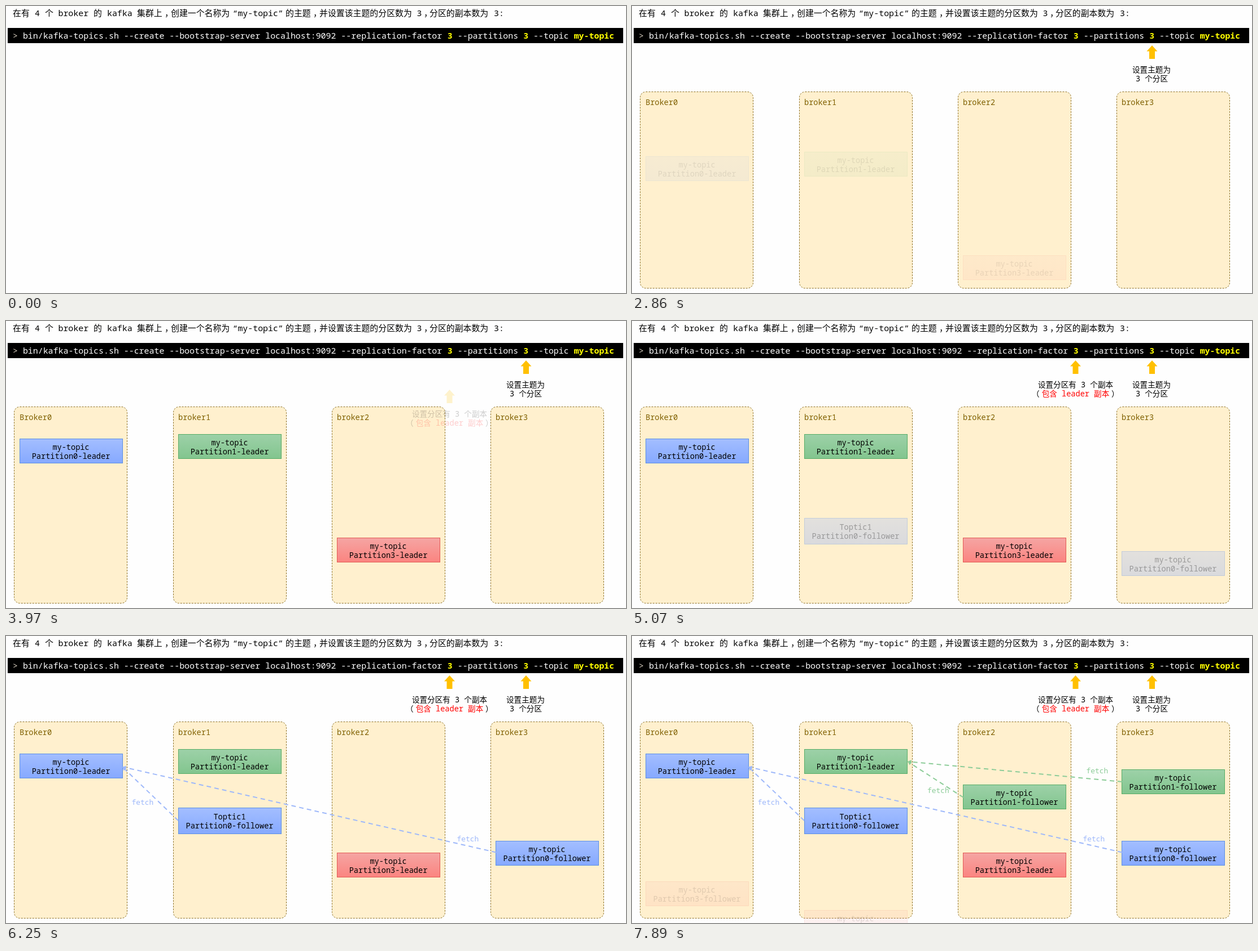
An HTML page with a canvas that plays this animation: 1098 px wide and 510 px high, repeating every 8000 ms.

```html
<!DOCTYPE html>
<html lang="zh-CN">
<head>
<meta charset="utf-8">
<title>Topic partitions and replicas</title>
<style>
html, body { margin: 0; width: 100%; height: 100%; overflow: hidden; background: #fefefe; }
canvas { display: block; }
</style>
</head>
<body>
<canvas id="stage" width="1098" height="510"></canvas>
<script>
const ctx = document.getElementById('stage').getContext('2d');
const LOOP = 8000;
const RISE = 59;
const FAMILY = '"Noto Sans Mono", "Noto Sans CJK SC", "Noto Sans CJK", monospace';
const CELL = 0.6;

// [first change, last change, number of pictures]
const BURSTS = [
  [600, 1160, 8], [1850, 2620, 11], [2700, 3500, 11], [3570, 4360, 11],
  [4430, 5160, 10], [5240, 6030, 11], [6100, 6900, 11], [6970, 7740, 11], [7820, 7890, 2]
];

const COLORS = {
  blue: { top: '#a3beff', bottom: '#86a9ff', edge: '#5b8fe3', rgb: '158,184,250' },
  green: { top: '#9dd1a8', bottom: '#82c58e', edge: '#55ac66', rgb: '140,204,152' },
  red: { top: '#f5a5a3', bottom: '#fb8480', edge: '#e25a55' }
};

const clamp = v => Math.max(0, Math.min(1, v));

// Column edges, snapped so that thin outlines stay crisp.
const column = (first, i) => Math.floor(first + 281.2 * i) + 0.5;
const brokerX = i => column(14.9, i);
const cardX = i => column(24.4, i);

// Steady motion with a short speed-up and slow-down.
function glide(t, up = 0.2, down = 0.1) {
  const speed = 1 / (1 - (up + down) / 2);
  if (t < up) return speed * t * t / (2 * up);
  if (t > 1 - down) return 1 - speed * (1 - t) ** 2 / (2 * down);
  return speed * (t - up / 2);
}

function heldTime(t) {
  let held = 0;
  for (const [from, to, count] of BURSTS) {
    if (t < from) break;
    const step = (to - from) / (count - 1);
    held = from + step * Math.min(count - 1, Math.floor((t - from) / step + 0.15));
  }
  return held;
}

function text(str, x, y, size, color, align = 'left', weight = 400) {
  ctx.font = `${weight} ${size}px ${FAMILY}`;
  ctx.fillStyle = color;
  ctx.textAlign = align;
  ctx.fillText(str, x, y);
}

function floatIn(now, start, draw) {
  const t = clamp((now - start) / 1000);
  if (!t) return;
  ctx.save();
  ctx.globalAlpha = t;
  ctx.translate(0, Math.round(RISE * (1 - glide(t))));
  draw();
  ctx.restore();
}

function header() {
  const parts = [
    ['在有', 12], ['4', 51], ['个', 69], ['broker', 92.5], ['的', 155], ['kafka', 179],
    ['集群上', 232], ['，', 281], ['创建一个名称为', 292], ['“my-topic”', 401.5],
    ['的主题', 495], ['，', 544], ['并设置该主题的分区数为', 555],
    ['3', 727.5], ['，', 740], ['分区的副本数为', 750], ['3:', 864]
  ];
  for (const [str, x] of parts) text(str, x, 18, 14.9, '#000');

  ctx.fillStyle = '#000';
  ctx.fillRect(3, 39, 1090, 27);
  const size = 14.92;
  let x = 12;
  const add = (str, color, weight) => {
    text(str, x, 58, size, color, 'left', weight);
    x += str.length * size * CELL;
  };
  add('> ', '#d8cfc0');
  add('bin/kafka-topics.sh --create --bootstrap-server localhost:9092 --replication-factor ', '#fff');
  add('3', '#ff0', 700);
  add(' --partitions ', '#fff');
  add('3', '#ff0', 700);
  add(' --topic ', '#fff');
  add('my-topic', '#ff0', 700);
}

function brokers(now) {
  ctx.save();
  ctx.globalAlpha = clamp((now - 540) / 600);
  for (let i = 0; i < 4; i++) {
    ctx.beginPath();
    ctx.roundRect(brokerX(i), 152.5, 200, 349, 10);
    ctx.fillStyle = '#fff0ce';
    ctx.fill();
    ctx.strokeStyle = '#8f7224';
    ctx.lineWidth = 1;
    ctx.setLineDash([3, 2]);
    ctx.stroke();
    text((i ? 'broker' : 'Broker') + i, cardX(i) - 0.5, 175.5, 13.6, '#7f6000');
  }
  ctx.restore();
}

function arrowUp(x) {
  ctx.fillStyle = '#ffc000';
  ctx.beginPath();
  ctx.moveTo(x, 70);
  for (const [dx, y] of [[9.5, 80.5], [5, 80.5], [5, 94], [-5, 94], [-5, 80.5], [-9.5, 80.5]]) {
    ctx.lineTo(x + dx, y);
  }
  ctx.fill();
}

function partitionNote() {
  arrowUp(921);
  text('设置主题为', 920, 118, 13.6, '#000', 'center');
  text('3 个分区', 920.5, 134, 13.6, '#000', 'center');
}

function replicaNote() {
  arrowUp(785.5);
  text('设置分区有 3 个副本', 785.5, 118, 13.6, '#000', 'center');
  text('（', 708, 134, 13.6, '#000');
  text('包含 leader 副本', 785.5, 134, 13.6, '#f00', 'center');
  text('）', 849, 134, 13.6, '#000');
}

function card(broker, y, hue, label, title = 'my-topic', h = 43) {
  const x = cardX(broker);
  const w = 182;
  const c = COLORS[hue];
  const fill = ctx.createLinearGradient(0, y, 0, y + h);
  fill.addColorStop(0, c.top);
  fill.addColorStop(1, c.bottom);
  ctx.fillStyle = fill;
  ctx.fillRect(x, y, w, h);
  ctx.strokeStyle = c.edge;
  ctx.lineWidth = 1;
  ctx.strokeRect(x, y, w, h);
  const base = Math.floor(y + h / 2) - 2;
  text(title, x + w / 2 - 0.5, base, 13.6, '#000', 'center');
  text(label, x + w / 2 - 0.5, base + 16, 13.6, '#000', 'center');
}

// Soft wipe from the bottom, done with a fading vertical paint.
function wipePaint(p, top, bottom, rgb) {
  const h = bottom - top;
  const soft = 0.4;
  const front = bottom - p * (1 + soft) * h;
  const paint = ctx.createLinearGradient(0, front + soft * h, 0, front);
  paint.addColorStop(0, `rgba(${rgb},1)`);
  paint.addColorStop(1, `rgba(${rgb},0)`);
  return paint;
}

function link(x1, y1, x2, y2, paint) {
  const angle = Math.atan2(y2 - y1, x2 - x1);
  ctx.save();
  ctx.strokeStyle = ctx.fillStyle = paint;
  ctx.lineWidth = 2;
  ctx.setLineDash([8, 6]);
  ctx.beginPath();
  ctx.moveTo(x1, y1);
  ctx.lineTo(x2 - 4 * Math.cos(angle), y2 - 4 * Math.sin(angle));
  ctx.stroke();
  ctx.beginPath();
  ctx.moveTo(x2, y2);
  for (const side of [-1, 1]) {
    const a = angle + side * 0.46;
    ctx.lineTo(x2 - 7.5 * Math.cos(a), y2 - 7.5 * Math.sin(a));
  }
  ctx.fill();
  ctx.restore();
}

function fetches(now, start, hue, tip, bottom, links) {
  const p = clamp((now - start) / 500);
  if (!p) return;
  const paint = wipePaint(p, tip[1] - 2, bottom, COLORS[hue].rgb);
  for (const [x, y, tx, ty] of links) {
    link(x, y, tip[0], tip[1], paint);
    text('fetch', tx, ty, 12.9, paint);
  }
}

function draw(now) {
  ctx.globalAlpha = 1;
  ctx.fillStyle = '#fefefe';
  ctx.fillRect(0, 0, 1098, 510);
  header();
  brokers(now);
  floatIn(now, 1770, partitionNote);
  floatIn(now, 2770, () => {
    card(0, 209.5, 'blue', 'Partition0-leader');
    card(1, 201.5, 'green', 'Partition1-leader');
    card(2, 385.5, 'red', 'Partition3-leader');
  });
  floatIn(now, 3770, replicaNote);
  floatIn(now, 4770, () => {
    card(1, 305.5, 'blue', 'Partition0-follower', 'Toptic1', 46);
    card(3, 364.5, 'blue', 'Partition0-follower');
  });
  fetches(now, 5770, 'blue', [206, 232.5], 385, [[305, 328, 222.5, 300], [868, 384.5, 798.5, 364.5]]);
  floatIn(now, 6270, () => {
    card(2, 264.5, 'green', 'Partition1-follower');
    card(3, 237.5, 'green', 'Partition1-follower');
  });
  fetches(now, 7270, 'green', [488, 223], 287, [[587, 287, 523, 278.5], [868, 259, 804.5, 243.5]]);
  floatIn(now, 7770, () => {
    card(0, 379.5, 'red', 'Partition3-follower');
    card(1, 430.5, 'red', 'Partition3-follower');
  });
}

const began = performance.now();
function tick() {
  draw(heldTime((performance.now() - began) % LOOP));
  requestAnimationFrame(tick);
}
tick();
</script>
</body>
</html>
```
